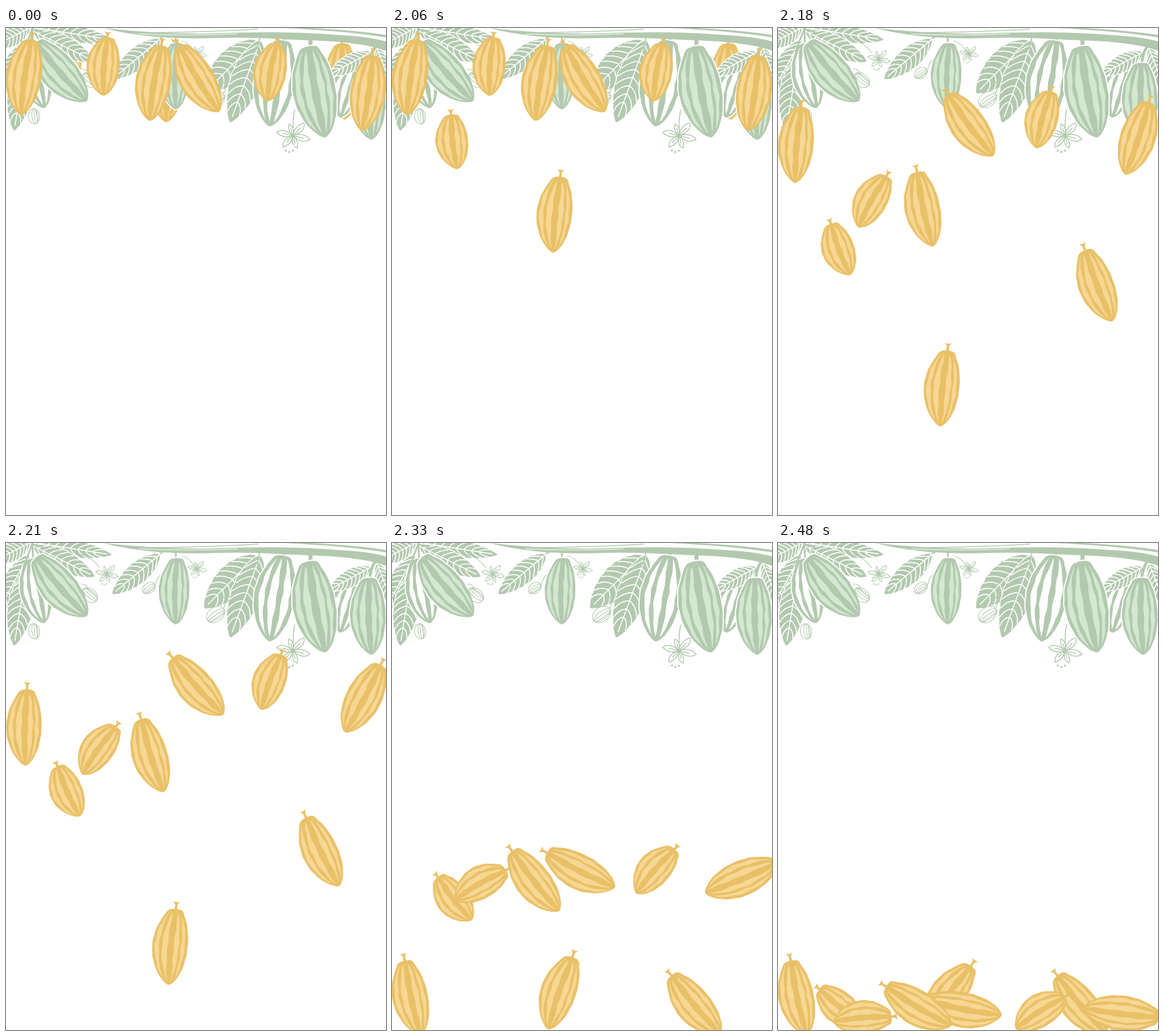
Recreate the animation shown at these times as an HTML page. Size 649 by 832 pixels, loop 2.51 s.

```html
<!DOCTYPE html>
<html lang="en">
<head>
<meta charset="utf-8">
<title>Falling cocoa pods</title>
<style>
  html, body { margin: 0; width: 100%; height: 100%; overflow: hidden; background: #fff; }
  svg { display: block; width: 100vw; height: 100vh; }
</style>
</head>
<body>
<svg viewBox="0 0 649 832">
  <g id="back"></g>
  <g id="tree"></g>
  <g id="front"></g>
</svg>
<script>
const GREEN = '#b3c9af', MINT = '#d3e8d1', GOLD = '#e8c067', CREAM = '#f7d793', WHITE = '#fff';
const LOOP = 2510, STILL = 2000, STEP = 30;
const { PI, sin, cos, pow, hypot, atan2 } = Math;
const $ = id => document.getElementById(id);
const fix = n => +n.toFixed(2);
const range = (n, f) => Array.from({ length: n }, (_, i) => f(i));

// Closed Catmull-Rom curve through the points
function smooth(pts) {
  const n = pts.length, at = i => pts[(i + n) % n];
  const ctrl = (p, a, b, s) => [fix(p[0] + s * (b[0] - a[0]) / 6), fix(p[1] + s * (b[1] - a[1]) / 6)];
  return 'M' + pts[0].map(fix) + pts.map((p, i) => {
    const q = at(i + 1);
    return `C${ctrl(p, at(i - 1), q, 1)} ${ctrl(q, p, at(i + 2), -1)} ${q.map(fix)}`;
  }).join('') + 'Z';
}

const path = (d, fill, extra = '') => `<path d="${d}" fill="${fill}" ${extra}/>`;
const line = (d, width, color = GREEN) =>
  path(d, 'none', `stroke="${color}" stroke-width="${width}" stroke-linecap="round" stroke-linejoin="round"`);
const halo = w => `stroke="#fff" stroke-width="${w}" paint-order="stroke"`;
const placed = (x, y, turn, body) => `<g transform="translate(${x} ${y}) rotate(${fix(turn)})">${body}</g>`;
const degrees = (dx, dy) => atan2(dy, dx) * 180 / PI;

// Ribs are [middle, half width] across the pod, from -1 to 1
const RIBS = [[-.73, .12], [-.29, .16], [.36, .14], [.73, .1]];
const WIDE = [[-.62, .14], [-.08, .2], [.58, .19]];

// Pod hanging from (0,0) down to (0,len)
function pod(len, half, base, light, { ribs = RIBS, bow = -4, extra = '' } = {}) {
  const spot = (u, v) => {
    const w = half * pow(1 - v, .68) * pow(v + .06, .7) / .42;
    return [bow * sin(PI * v) + u * w * (1 + .012 * sin(v * 34 + u)), len * v];
  };
  const N = 16;
  const edge = u => range(N, i => spot(u, 1 - pow(1 - i / N, 1.5)));
  const rib = ([mid, w]) => {
    const side = s => range(13, i => {
      const k = i / 12, v = .035 + .91 * k;
      return spot(mid + .025 * sin(v * 23 + mid * 9 + s) + s * w * pow(sin(PI * k) + .001, .45), v);
    });
    return smooth([...side(1), ...side(-1).reverse()]);
  };
  return path(smooth([...edge(1), spot(0, 1), ...edge(-1).reverse()]), base, extra) +
    path(ribs.map(rib).join(''), light);
}

function greenPod(x0, y0, x1, y1, light = MINT, ribs = RIBS) {
  const len = hypot(x1 - x0, y1 - y0);
  return placed(x0, y0, degrees(x1 - x0, y1 - y0) - 90,
    pod(len, .235 * len, GREEN, light, { ribs, extra: halo(4) }));
}

function leaf(x0, y0, x1, y1, plump = .17) {
  const len = hypot(x1 - x0, y1 - y0), half = plump * len, N = 22, veins = 8;
  const spot = (u, v) => [len * v, u * half * pow(sin(PI * pow(v, .9)), .7) * (1 + .03 * sin(v * 44))];
  const edge = u => range(N, i => spot(u, i / N));
  const pt = (u, v) => spot(u, v).map(fix);
  const rib = (i, s) => {
    const v = .05 + .8 * i / veins;
    return `M${pt(0, v)}Q${pt(s * .6, v + .04)} ${pt(s * .95, v + .14)}`;
  };
  const d = `M0 0H${fix(len * .93)}` + range(veins, i => rib(i, -1) + rib(i, 1)).join('');
  return placed(x0, y0, degrees(x1 - x0, y1 - y0),
    path(smooth([...edge(-1), [len, 0], ...edge(1).slice(1).reverse()]), GREEN, halo(3)) + line(d, 1.7, WHITE));
}

function nut(x, y, r, turn) {
  const ring = k => `<ellipse cx="${fix(r * .25 * (1 - k))}" rx="${fix(r * .73 * k)}" ry="${r}"/>`;
  return placed(x, y, turn,
    `<g fill="none" stroke="${GREEN}" stroke-width="1.1">${[1, .55, .2].map(ring).join('')}</g>`);
}

function flower(x, y, r) {
  const petal = i => {
    const a = .2 + i * PI / 3, k = r * (.85 + .15 * cos(i * 2.4));
    const p = (f, b) => [fix(f * k * cos(a + b)), fix(f * k * sin(a + b))];
    return `M0 0Q${p(.62, -.55)} ${p(1, 0)}Q${p(.75, .55)} 0 0M0 0L${p(.62, .04)}`;
  };
  const d = range(6, petal).join('');
  const dots = range(3, i => `<circle cx="${fix(r * (.2 * i - .4))}" cy="${fix(r * (.85 + .08 * sin(PI * i / 2)))}" r="${fix(r * .06)}" fill="${GREEN}"/>`);
  return placed(x, y, 0, path(d, WHITE) + line(d, .6 + r * .03) + dots.join(''));
}

$('tree').innerHTML = [
  // left cluster
  leaf(40, 0, -22, 32, .22),
  leaf(38, 22, -14, 118),
  leaf(34, 52, 14, 175),
  greenPod(44, 28, 65, 137, WHITE, WIDE),
  leaf(52, 0, 180, 20, .11),
  leaf(48, 6, 151, 57, .15),
  line('M45 0L46 24M44 4L30 40M44 2L62 6', 3),
  greenPod(52, 26, 138, 125),
  line('M130 20Q146 24 160 42M128 70Q138 70 140 77', 1.2),
  flower(172, 53, 20),
  nut(143, 89, 15, -50),
  nut(48, 151, 13, -8),
  // middle
  line('M268 16Q262 18 255 24', 2),
  leaf(262, 20, 182, 87),
  nut(244, 77, 12, 55),
  line('M256 70Q258 60 264 54M300 22Q312 24 322 40', 1.2),
  flower(326, 44, 17),
  line('M290 15V30', 3),
  greenPod(292, 27, 290, 139),
  leaf(427, 22, 339, 111, .21),
  line('M372 111Q378 100 372 92', 1.4),
  nut(358, 122, 17, 55),
  leaf(434, 22, 383, 161),
  line('M433 14Q434 24 428 36', 2),
  // right
  line('M474 14V28', 7),
  greenPod(473, 23, 450, 168, WHITE, WIDE),
  greenPod(600, 54, 570, 153, WHITE, WIDE),
  leaf(622, 42, 552, 80, .18),
  leaf(634, 36, 664, 112),
  line('M493 140Q489 160 491 178', 1.6),
  flower(490, 184, 30),
  line('M520 14V38', 7),
  greenPod(517, 33, 545, 187),
  line('M632 30Q622 42 621 66', 5),
  greenPod(620, 61, 624, 191),
  // branch
  path('M166 0C230 7 300 11 360 9S480 6 540 10S620 15 649 23V39C620 28 575 23 520 21S420 15 360 17S230 17 166 0Z', GREEN),
  line('M228 10Q310 14 395 10', 1.2, WHITE),
  line('M250 8Q340 7 430 2', 1.6),
  path('M474 0H520Q600 4 649 12V16Q580 5 474 0Z', GREEN)
].join('');

const sheet = document.head.appendChild(document.createElement('style'));
const BIG = 143, SMALL = 110, TINY = 103;
let count = 0;

// Yellow pod that moves evenly, one step at a time, through poses {at, x, y, lean}
function drop(layer, size, poses, bow) {
  const id = 'pod' + count++, top = -size / 2, stem = size / 10, len = size - stem;
  $(layer).innerHTML += `<g id="${id}">` +
    path(`M-6 ${top}Q0 ${top + 2} 6 ${top}L2 ${top + 5}V${top + stem + 3}H-2V${top + 5}Z`, GOLD) +
    placed(0, top + stem, 0, pod(len, 22 + .066 * len, GOLD, CREAM, { bow })) + '</g>';

  const keys = poses.map(({ at, x, y, lean }, i) => {
    const pct = (STILL + STEP * (at - 1)) / LOOP * 100 + '%', next = poses[i + 1];
    const when = i === 0 ? '0%,' + pct : next ? pct : pct + ',100%';
    const pace = next ? `animation-timing-function:steps(${next.at - at})` : '';
    return `${when}{transform:translate(${x}px,${y}px) rotate(${-lean}deg);${pace}}`;
  });
  sheet.textContent += `@keyframes ${id}{${keys.join('')}}#${id}{animation:${id} ${LOOP}ms infinite}`;
}

drop('back', TINY, [{ at: 0, x: 106, y: 52, lean: -4 }, { at: 16, x: 104, y: 788, lean: 52 }]);
drop('back', BIG, [
  { at: 0, x: 280, y: 90, lean: -5.6 },
  { at: 9, x: 285, y: 758, lean: -5.6 },
  { at: 16, x: 295, y: 770, lean: -36 }
]);
drop('back', BIG, [{ at: 3, x: 576, y: 85, lean: 2 }, { at: 11, x: 515, y: 784, lean: 40 }]);
drop('front', BIG, [{ at: 6, x: 35, y: 78, lean: -8 }, { at: 12, x: 34, y: 771, lean: 12 }]);
drop('front', SMALL, [{ at: 3, x: 170, y: 61, lean: -4 }, { at: 16, x: 149, y: 813, lean: -85 }]);
drop('front', SMALL, [{ at: 6, x: 455, y: 71, lean: -9 }, { at: 15, x: 452, y: 800, lean: -57 }]);
drop('front', BIG, [{ at: 6, x: 327, y: 82, lean: 31 }, { at: 15, x: 312, y: 793, lean: 79 }]);
drop('front', BIG, [{ at: 3, x: 256, y: 88, lean: -9 }, { at: 16, x: 235, y: 788, lean: 59 }]);
drop('front', BIG, [{ at: 6, x: 618, y: 105, lean: -8 }, { at: 15, x: 592, y: 803, lean: -97 }], 1);
</script>
</body>
</html>
```
